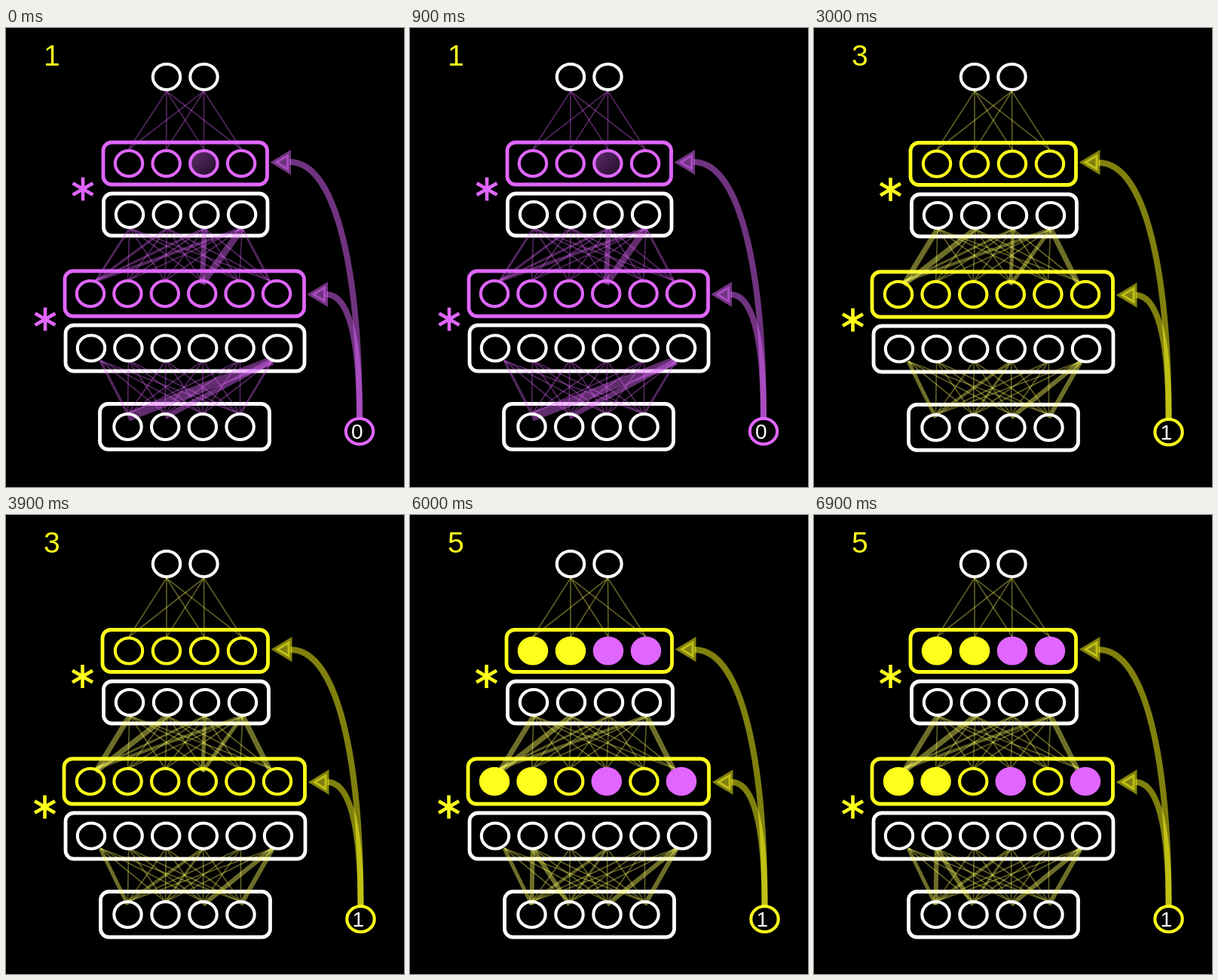
Write an HTML page that moves like this. It is 528 px wide and 610 px high and loops after 7.5 s.

```html
<!DOCTYPE html>
<html lang="en">
<head>
<meta charset="utf-8">
<title>Gated network</title>
<style>
  html, body { margin: 0; width: 100%; height: 100%; overflow: hidden; background: #000; }
  svg { display: block; width: 528px; height: 610px; }
  text { font-family: "Liberation Sans", Arial, sans-serif; }
  .step { visibility: hidden; animation: show 7.5s step-end infinite; }
  @keyframes show {
    0% { visibility: visible; }
    20%, 100% { visibility: hidden; }
  }
</style>
</head>
<body>
<svg id="stage" viewBox="0 0 528 610" fill="none">
  <defs>
    <linearGradient id="dim" x1="0" y1="0" x2="1" y2="1">
      <stop offset=".1" stop-color="#5c2b69"/>
      <stop offset=".9" stop-color="#25102c"/>
    </linearGradient>
  </defs>
</svg>
<script>
const PURPLE = '#e066ff', YELLOW = '#ffff1c', WHITE = '#fff';

// Connection widths, keyed by upper node then lower node (1-based).
const taskA = {
  mid: { 11: 3, 21: 3, 31: 3, 41: 4, 34: 7, 44: 9, 46: 3 },
  low: { 11: 3.5, 31: 2, 61: 12, 62: 7, 64: 3 }
};
const taskB = {
  mid: { 11: 7, 21: 7, 31: 3, 41: 4, 46: 7 },
  low: { 11: 5, 41: 4, 42: 3, 63: 6, 64: 6 }
};
const rerouted = { mid: taskB.mid, low: { ...taskB.low, 21: 6, 22: 6 } };
const beforeCut = { mid: { ...taskB.mid, 34: 5, 44: 5 }, low: taskB.low };

// Gate letters: o open, d dim, p purple, y yellow.
const first = { color: PURPLE, link: PURPLE, task: 0, dx: 0, dy: 0,
  narrow: 49.7, wide: 49.4, left: 0, right: 0 };
const second = { ...first, dx: 1, narrow: 50, wide: 49.5, right: 1 };
const later = { ...first, color: YELLOW, link: '#ffff60', task: 1, dy: 1,
  narrow: 50, wide: 49.6, left: -1, right: 1 };
const steps = [
  { ...first, links: taskA, upper: 'oodo', lower: 'oooooo' },
  { ...second, links: taskA, upper: 'oopp', lower: 'ooopop' },
  { ...later, links: beforeCut, upper: 'oooo', lower: 'oooooo' },
  { ...later, links: rerouted, upper: 'oopp', lower: 'ooopop' },
  { ...later, links: rerouted, upper: 'yypp', lower: 'yyopop' }
];

const stage = document.getElementById('stage');

function add(parent, tag, attrs, text) {
  const el = document.createElementNS('http://www.w3.org/2000/svg', tag);
  for (const key in attrs) el.setAttribute(key, attrs[key]);
  if (text !== undefined) el.textContent = text;
  parent.append(el);
  return el;
}

const row = (x, gap, n) => Array.from({ length: n }, (_, i) => x + i * gap);

// Move the outermost anchors of a row inwards.
const tuck = (xs, a, b) => xs.map((x, i) => i === 0 ? x + a : i === xs.length - 1 ? x - b : x);

function box(g, x1, y1, x2, y2, stroke) {
  add(g, 'rect', { x: x1 + 2, y: y1 + 2, width: x2 - x1 - 4, height: y2 - y1 - 4,
    rx: 11, stroke, 'stroke-width': 4.8 });
}

function nodes(g, xs, y, color, fills = '') {
  const paint = { p: PURPLE, y: YELLOW, d: 'url(#dim)' };
  xs.forEach((cx, i) => {
    const kind = fills[i];
    const stroke = 'py'.includes(kind || '-') ? paint[kind] : color;
    add(g, 'ellipse', { cx, cy: y, rx: 18.2, ry: 17, stroke, 'stroke-width': 4.1,
      fill: paint[kind] || 'none' });
  });
}

function connect(g, from, y1, to, y2, color, widths = {}) {
  from.forEach((x1, i) => to.forEach((x2, j) => {
    const width = widths[(i + 1) * 10 + j + 1] || 1.7;
    add(g, 'line', { x1, y1, x2, y2: width > 4.5 ? y2 + 4 : y2, stroke: color,
      'stroke-width': width, 'stroke-opacity': width > 4.5 ? .43 : .36 });
  }));
}

function arrow(g, curve, x, y, color) {
  const paint = { stroke: color, 'stroke-opacity': .5 };
  add(g, 'path', { d: curve, 'stroke-width': 8, ...paint });
  add(g, 'path', { d: `M${x + 7} ${y}l19 -11.5v23z`, 'stroke-width': 6,
    fill: color, 'fill-opacity': .5, ...paint });
}

function star(g, x, y, color) {
  for (const turn of [0, 60, 120]) {
    add(g, 'path', { d: `M${x} ${y - 15.5}v31`, stroke: color, 'stroke-width': 4.6,
      transform: `rotate(${turn} ${x} ${y})` });
  }
}

function draw(step, index) {
  const { color, link, task, dx, dy, narrow, wide, left, right, links } = step;
  const g = add(stage, 'g', { class: 'step', style: `animation-delay:${(index - 5) * 1.5}s` });
  add(g, 'text', { x: 50, y: 50, 'font-size': 39, fill: YELLOW }, index + 1);

  const net = add(g, 'g', { transform: `translate(0 ${dy})` });
  const top = [213 + dx / 2, 262.5 + dx / 2];
  const gateUp = row(163 + dx, narrow, 4);
  const hidUp = row(164 + dx, narrow, 4);
  const gateLow = row(112 + dx, wide, 6);
  const hidLow = row(113 + dx, wide, 6);
  const input = row(161.5 + dx, narrow, 4);

  box(net, 127 + left, 150 - dy * .5, 348.5 + right, 210 - dy * .5, color);
  box(net, 127.5, 218, 349 + right * 1.5, 278, WHITE);
  box(net, 76 + left, 321, 397.5 + right, 385, color);
  box(net, 77, 393, 398 + right, 458, WHITE);
  box(net, 122.5 + right, 497.5, 351.5 + right, 562, WHITE);

  connect(net, top, 84 - dy, gateUp, 161, link);
  connect(net, hidUp, 266, tuck(gateLow, 7, 9), 336, link, links.mid);
  connect(net, tuck(hidLow, 12, 7), 442, input, 513, link, links.low);

  nodes(net, top, 65 - dy, WHITE);
  nodes(net, gateUp, 180 - dy * .5, color, step.upper);
  nodes(net, hidUp, 248, WHITE);
  nodes(net, gateLow, 353, color, step.lower);
  nodes(net, hidLow, 425.5, WHITE);
  nodes(net, input, 530, WHITE);

  star(net, 102 + left * .5, 214 - dy * .5, color);
  star(net, 52 + left * .5, 387, color);

  const side = add(net, 'g', { transform: `translate(${right * 1.5} 0)` });
  arrow(side, 'M469 518C469 330 440 178 376 178', 349, 178.5 - dy, color);
  arrow(side, 'M469 518C469 440 461 354 425 354', 398, 354, color);
  nodes(side, [469], 536, color);
  add(side, 'text', { x: 458, y: 546, 'font-size': 28, fill: WHITE }, task);
}

steps.forEach(draw);
</script>
</body>
</html>
```
